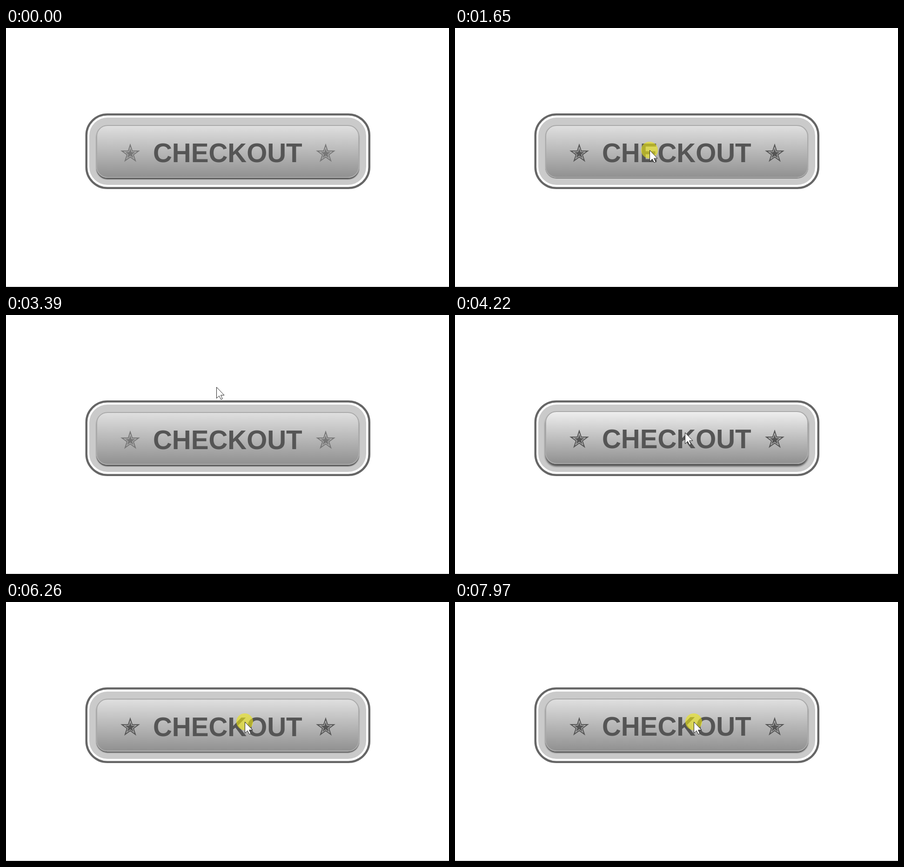
Recreate the animation shown at these times as an HTML page. Size 952 by 558 pixels, loop 8000 ms.

```html
<!DOCTYPE html>
<html lang="en">
<head>
<meta charset="utf-8">
<title>Checkout button</title>
<style>
  html, body { margin: 0; width: 100%; height: 100%; overflow: hidden; background: #fff; }
  #stage { position: relative; width: 952px; height: 558px; overflow: hidden; }
  svg { position: absolute; left: 0; top: 0; }
  #face {
    position: absolute; left: 194px; top: 209px; width: 565px; height: 114px;
    box-sizing: border-box; border: 2px solid #aaa; border-radius: 24px;
  }
  text { font: bold 56.6px "Liberation Sans", Arial, sans-serif; fill: #555; text-anchor: middle; }
</style>
</head>
<body>
<div id="stage">
  <svg width="952" height="558">
    <rect x="172.75" y="186.25" width="608" height="158.5" rx="45" fill="#fff" stroke="#666" stroke-width="4.5"/>
    <rect x="179" y="193" width="595" height="145" rx="39" fill="#cacaca"/>
    <rect y="557" width="952" height="1" fill="#bbb"/>
  </svg>
  <div id="face"></div>
  <svg width="952" height="558">
    <g id="label">
      <text x="476.3" y="289.3">CHECKOUT</text>
      <path id="stars" fill-rule="evenodd"/>
    </g>
    <g id="pointer">
      <circle id="halo" r="18" fill="rgb(238,232,20)" fill-opacity=".6"/>
      <path d="M.5 .5V24.5L6 19.3 10 27 13.2 25.6 9.6 17.8H17Z" fill="#fff" stroke="#222" stroke-width="1"/>
    </g>
  </svg>
</div>
<script>
const LOOP = 8000, FADE = 480;
const $ = id => document.getElementById(id);
const face = $('face'), label = $('label'), stars = $('stars'), pointer = $('pointer'), halo = $('halo');

const looks = {
  rest:  { lift: 0, drop: 3, blur: 2, top: '#dfdfdf', star: '#777' },
  hover: { lift: 2, drop: 5, blur: 4, top: '#eee',    star: '#555' },
  press: { lift: 0, drop: 1, blur: 1, top: '#dfdfdf', star: '#555' }
};

// time, look
const states = [
  [-FADE, 'rest'], [620, 'hover'], [1210, 'press'], [2310, 'hover'], [3040, 'rest'],
  [3790, 'hover'], [4780, 'rest'], [5345, 'hover'], [6070, 'press'], [7020, 'hover'], [7830, 'press']
];

// time, x, y of the pointer tip
const path = [
  [390, 802, 503], [850, 418, 263], [2930, 418, 263], [3180, 452, 155], [3690, 452, 155],
  [3920, 494, 253], [4640, 494, 253], [4920, 530, 157], [5150, 530, 157], [5455, 513, 258]
];

function star(cx, cy, r) {
  const pts = [];
  for (let i = 0; i < 10; i++) {
    const a = i * Math.PI / 5, d = i % 2 ? r * 0.382 : r;
    pts.push((cx + d * Math.sin(a)).toFixed(2) + ' ' + (cy - d * Math.cos(a)).toFixed(2));
  }
  return 'M' + pts.join('L') + 'Z';
}
stars.setAttribute('d', [267, 687].map(x => [22, 15.5, 11.5].map(r => star(x, 270.8, r)).join('')).join(''));

const mix = (a, b, k) => a + (b - a) * k;
const smooth = k => k * k * (3 - 2 * k);
const easeOut = k => 1 - (1 - k) ** 2;

// cubic-bezier(.25, .1, .25, 1)
function ease(x) {
  if (x >= 1) return 1;
  const curve = (p, q, s) => 3 * p * s * (1 - s) ** 2 + 3 * q * s * s * (1 - s) + s ** 3;
  let lo = 0, hi = 1;
  for (let i = 0; i < 20; i++) {
    const mid = (lo + hi) / 2;
    if (curve(0.25, 0.25, mid) < x) lo = mid; else hi = mid;
  }
  return curve(0.1, 1, lo);
}

function lastIndex(rows, t) {
  let i = rows.length - 1;
  while (i >= 0 && rows[i][0] > t) i--;
  return i;
}

function drawButton(t) {
  const i = lastIndex(states, t), [start, name] = states[i];
  const to = looks[name], from = looks[states[Math.max(0, i - 1)][1]];
  const k = ease((t - start) / FADE);
  const now = key => mix(from[key], to[key], k);
  const shift = `translateY(${-now('lift')}px)`;
  face.style.transform = label.style.transform = shift;
  face.style.boxShadow = `0 ${now('drop')}px ${now('blur')}px #555`;
  face.style.background = `linear-gradient(${to.top}, #919191)`;
  stars.style.fill = to.star;
  halo.style.display = name === 'press' ? '' : 'none';
}

function drawPointer(t) {
  const i = lastIndex(path, t);
  pointer.style.display = i < 0 ? 'none' : '';
  if (i < 0) return;
  const a = path[i], b = path[i + 1] || a;
  const k = b === a ? 0 : (i ? smooth : easeOut)((t - a[0]) / (b[0] - a[0]));
  const x = Math.round(mix(a[1], b[1], k)), y = Math.round(mix(a[2], b[2], k));
  pointer.setAttribute('transform', `translate(${x} ${y})`);
}

const begin = performance.now();
function tick() {
  const t = (performance.now() - begin) % LOOP;
  drawButton(t);
  drawPointer(t);
  requestAnimationFrame(tick);
}
tick();
</script>
</body>
</html>
```
